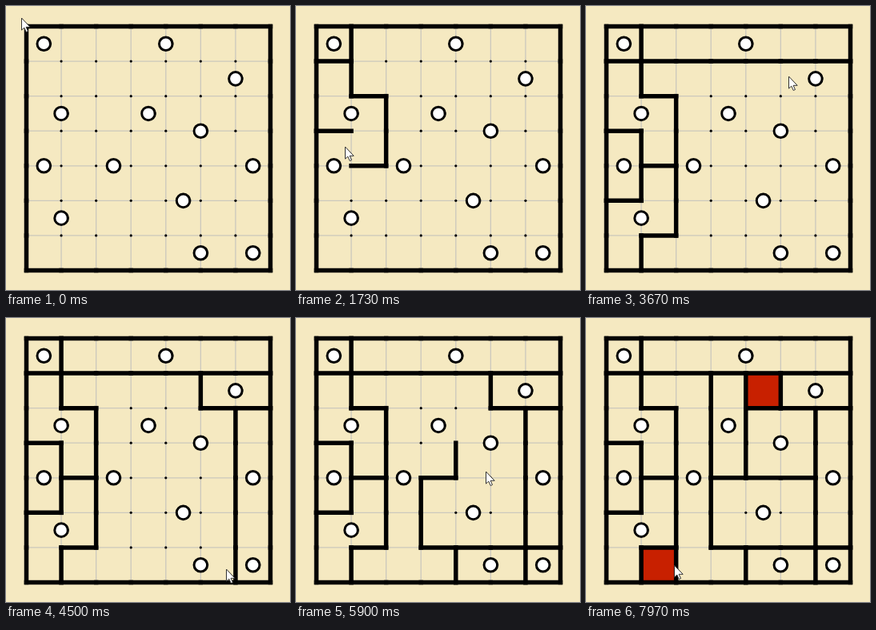
An HTML page with a canvas that plays this animation: 355x355 px, repeating every 8 s.

```html
<!DOCTYPE html>
<html lang="en">
<head>
<meta charset="utf-8">
<title>Drawing walls on a grid puzzle</title>
<style>
  html, body { margin: 0; width: 100%; height: 100%; overflow: hidden; background: #f5e9c1; }
  canvas { display: block; }
</style>
</head>
<body>
<canvas id="stage" width="355" height="355"></canvas>
<script>
const ctx = document.getElementById('stage').getContext('2d');
const DURATION = 8000, SIZE = 7, ORIGIN = 25.5, CELL = 305 / SIZE;
const at = n => ORIGIN + n * CELL;

// Circle centres in cell units
const circles = [
  [.5, .5], [4, .5], [6, 1.5], [1, 2.5], [3.5, 2.5], [5, 3], [.5, 4],
  [2.5, 4], [6.5, 4], [4.5, 5], [1, 5.5], [5, 6.5], [6.5, 6.5]
];

// One walk over the vertices: capitals build a wall, small letters only move.
// The walls of a leg are evenly spaced from its first to its last time.
const legs = [
  [480, 850, 'DL'], [1020, 1610, 'rDRDDLluR'], [1755, 2420, 'DDLrruDDLD'],
  [2960, 3390, 'uuuuuuRRRRRR'], [3720, 4040, 'llDRR'], [4290, 4474, 'lDDDDD'],
  [4680, 5070, 'ruLLLL'], [5230, 5740, 'rDluUURU'], [5930, 6500, 'dRRluuLD'],
  [7050, 7430, 'ldUUUrD'], [7930, 7930, 'llddddD']
];
const steps = { R: [1, 0], L: [-1, 0], U: [0, -1], D: [0, 1] };

// Follows moves from a vertex; returns the built edges and the last vertex
function walk(x, y, moves) {
  const edges = [];
  for (const move of moves) {
    const [dx, dy] = steps[move.toUpperCase()];
    if (steps[move]) edges.push([x, y, x + dx, y + dy]);
    x += dx;
    y += dy;
  }
  return { edges, x, y };
}

const border = walk(0, 0, [...'RDLU'].map(m => m.repeat(SIZE)).join('')).edges;
const walls = [];
let pen = { x: 1, y: 0 };
for (const [first, last, moves] of legs) {
  pen = walk(pen.x, pen.y, moves);
  const gap = (last - first) / (pen.edges.length - 1 || 1);
  pen.edges.forEach((edge, i) => walls.push({ time: first + i * gap, edge }));
}

// The cursor meets the middle of each wall as it is built, with some detours
const detours = [
  [0, 19, 15], [130, 19, 15], [1730, 61, 176], [2730, 188, 208], [4500, 275, 314],
  [5900, 237, 192], [6730, 161, 166], [6900, 128, 229], [7600, 228, 108], [7970, 110, 309]
];
const path = walls
  .map(({ time, edge: [x0, y0, x1, y1] }) => [time, at((x0 + x1) / 2), at((y0 + y1) / 2)])
  .concat(detours)
  .sort((a, b) => a[0] - b[0]);
const arrow = new Path2D('M0 0V14.6L3.3 11.6L5.7 17L8 16L5.6 10.8H10.2Z');

// Enclosed cells without a circle: time, column, row
const errors = [[7430, 4, 1], [7930, 1, 6]];

function cursorAt(t) {
  const next = path.findIndex(p => p[0] > t);
  if (next < 0) return path[path.length - 1].slice(1);
  const [t0, x0, y0] = path[next - 1], [t1, x1, y1] = path[next];
  const k = (t - t0) / (t1 - t0);
  return [x0 + (x1 - x0) * k, y0 + (y1 - y0) * k];
}

function line(x0, y0, x1, y1) {
  ctx.beginPath();
  ctx.moveTo(at(x0), at(y0));
  ctx.lineTo(at(x1), at(y1));
  ctx.stroke();
}

function disc(x, y, r) {
  ctx.beginPath();
  ctx.arc(at(x), at(y), r, 0, Math.PI * 2);
  ctx.fill();
}

function drawGrid() {
  ctx.strokeStyle = '#cbc8bd';
  ctx.lineWidth = 1.3;
  for (let i = 1; i < SIZE; i++) {
    line(i, 0, i, SIZE);
    line(0, i, SIZE, i);
  }
  ctx.fillStyle = '#000';
  for (let x = 1; x < SIZE; x++)
    for (let y = 1; y < SIZE; y++) disc(x, y, 1.6);
}

function drawErrors(t) {
  ctx.fillStyle = '#c82000';
  for (const [time, x, y] of errors)
    if (t >= time) ctx.fillRect(at(x), at(y), CELL, CELL);
}

function drawWalls(t) {
  ctx.strokeStyle = '#000';
  ctx.lineWidth = 5.5;
  ctx.lineCap = 'square';
  for (const edge of border) line(...edge);
  for (const { time, edge } of walls) if (t >= time) line(...edge);
}

function drawCircles() {
  ctx.lineWidth = 3;
  ctx.fillStyle = '#fff';
  for (const [x, y] of circles) {
    disc(x, y, 8.3);
    ctx.stroke();
  }
}

function drawCursor(t) {
  ctx.save();
  ctx.translate(...cursorAt(t).map(v => Math.round(v) + .5));
  ctx.lineWidth = 1;
  ctx.strokeStyle = '#333';
  ctx.fill(arrow);
  ctx.stroke(arrow);
  ctx.restore();
}

function draw(now) {
  const t = now % DURATION;
  ctx.fillStyle = '#f5e9c1';
  ctx.fillRect(0, 0, 355, 355);
  drawGrid();
  drawErrors(t);
  drawWalls(t);
  drawCircles();
  drawCursor(t);
}

let begin;
function tick(now) {
  begin ??= now;
  draw(now - begin);
  requestAnimationFrame(tick);
}
draw(0);
requestAnimationFrame(tick);
</script>
</body>
</html>
```
